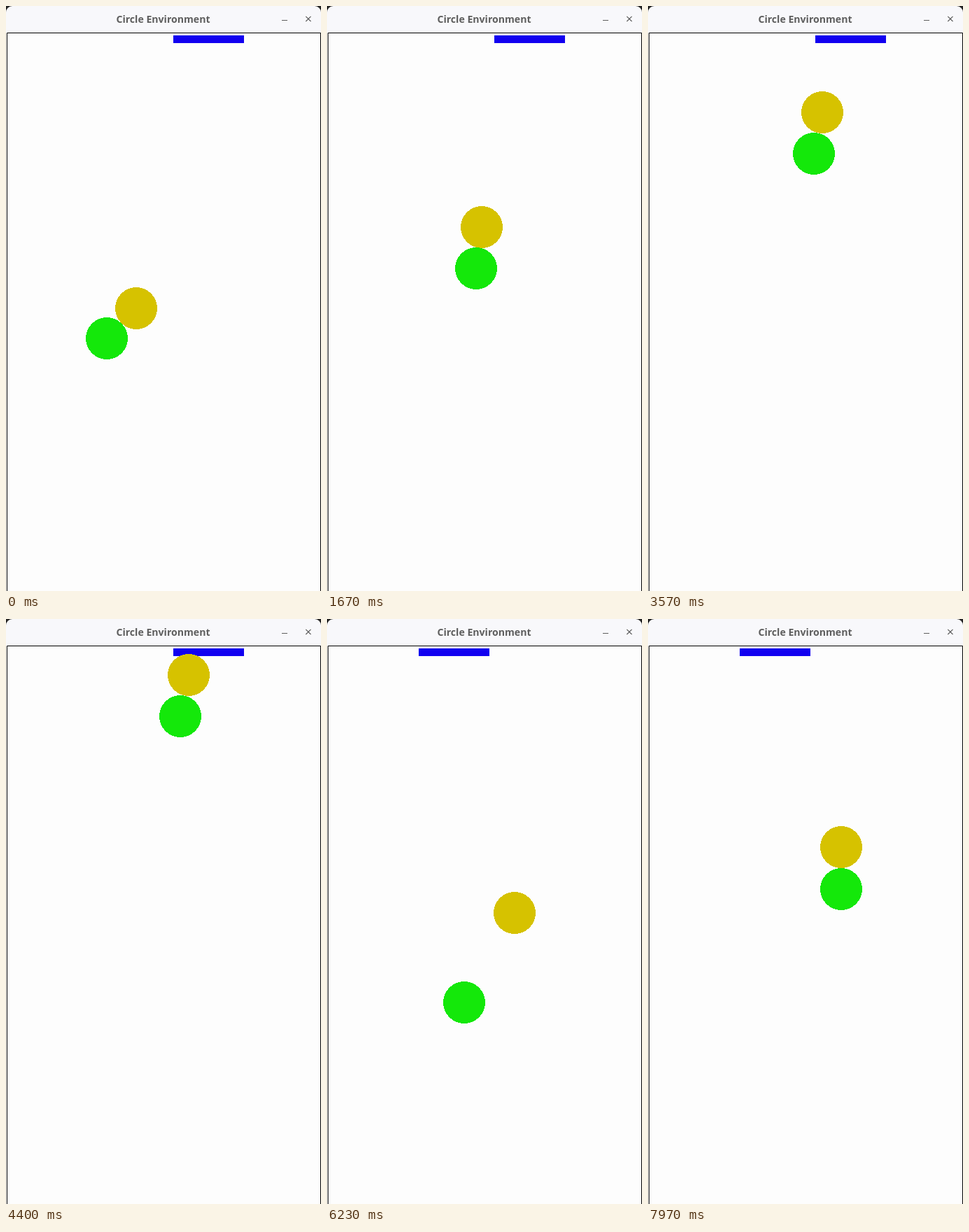
An HTML page that plays this animation: 450x836 px, repeating every 8000 ms.

```html
<!DOCTYPE html>
<html lang="en">
<head>
<meta charset="utf-8">
<title>Circle Environment</title>
<style>
  html, body { margin: 0; width: 100%; height: 100%; overflow: hidden; background: #fdfdfd; }
  svg { display: block; width: 100%; height: 100%; }
  text { font: bold 14.1px "Open Sans", "Noto Sans", sans-serif; fill: #5e5e5e; }
  circle { shape-rendering: crispEdges; }
</style>
</head>
<body>
<svg viewBox="0 0 450 836">
  <rect width="450" height="836" fill="#fdfdfd"/>
  <rect width="450" height="20" fill="#222"/>
  <path d="M0 38V9A9 9 0 0 1 9 0H441A9 9 0 0 1 450 9V38Z" fill="#f8f8fb"/>
  <text x="224.5" y="24" text-anchor="middle">Circle Environment</text>
  <path d="M394 20.5h8M428.3 14.8l7.2 7.2m0-7.2l-7.2 7.2" fill="none" stroke="#5e5e5e" stroke-width="1.2"/>
  <path d="M1.5 836V38.5H449.5V836" fill="none" stroke="#000"/>
  <rect id="goal" y="42" width="101" height="11" fill="#1200f0"/>
  <circle id="ball" r="30" fill="#d6c200"/>
  <circle id="agent" r="30" fill="#14e80a"/>
</svg>
<script>
const LOOP = 8000, STEP = 1000 / 30, GAP = 60;
const RESET = 4530, CONTACT = 6950;
const $ = id => document.getElementById(id);
const goal = $('goal'), ball = $('ball'), agent = $('agent');

const decay = (t, tau) => Math.exp(-t / tau);

function place(el, x, y) {
  el.setAttribute('cx', Math.round(x));
  el.setAttribute('cy', Math.round(y));
}

// The agent touches the ball from below, deg away from the vertical
function push(x, y, deg) {
  const a = deg * Math.PI / 180;
  place(ball, x, y);
  place(agent, x - GAP * Math.sin(a), y + GAP * Math.cos(a));
}

// The contact angle swings past its resting value while the ball gains speed
function firstPush(t) {
  const lag = 1 - decay(t, 450);
  const swing = decay(t, 852) * Math.cos(Math.PI * t / 2000);
  push(186 + 0.0145 * t + 11.2 * lag, 432 - 0.0865 * t + 28.8 * lag, 11.4 + 33 * swing);
}

// Straight run towards the waiting ball
function approach(t) {
  place(ball, 268, 420);
  place(agent, 66.8 + 0.0759 * t, 714.5 - 0.098 * t);
}

function secondPush(t) {
  const left = decay(t, 240);
  push(268 + 8.3 * (1 - left), 420 - 0.0922 * t, 17 * left);
}

function draw(time) {
  const t = Math.min(Math.floor((time + 4) / STEP) * STEP, LOOP - STEP);
  goal.setAttribute('x', t < RESET ? 239 : 131);
  if (t < RESET) firstPush(t);
  else if (t < CONTACT) approach(t - RESET);
  else secondPush(t - CONTACT);
}

const start = performance.now();
function tick() {
  draw((performance.now() - start) % LOOP);
  requestAnimationFrame(tick);
}
tick();
</script>
</body>
</html>
```
